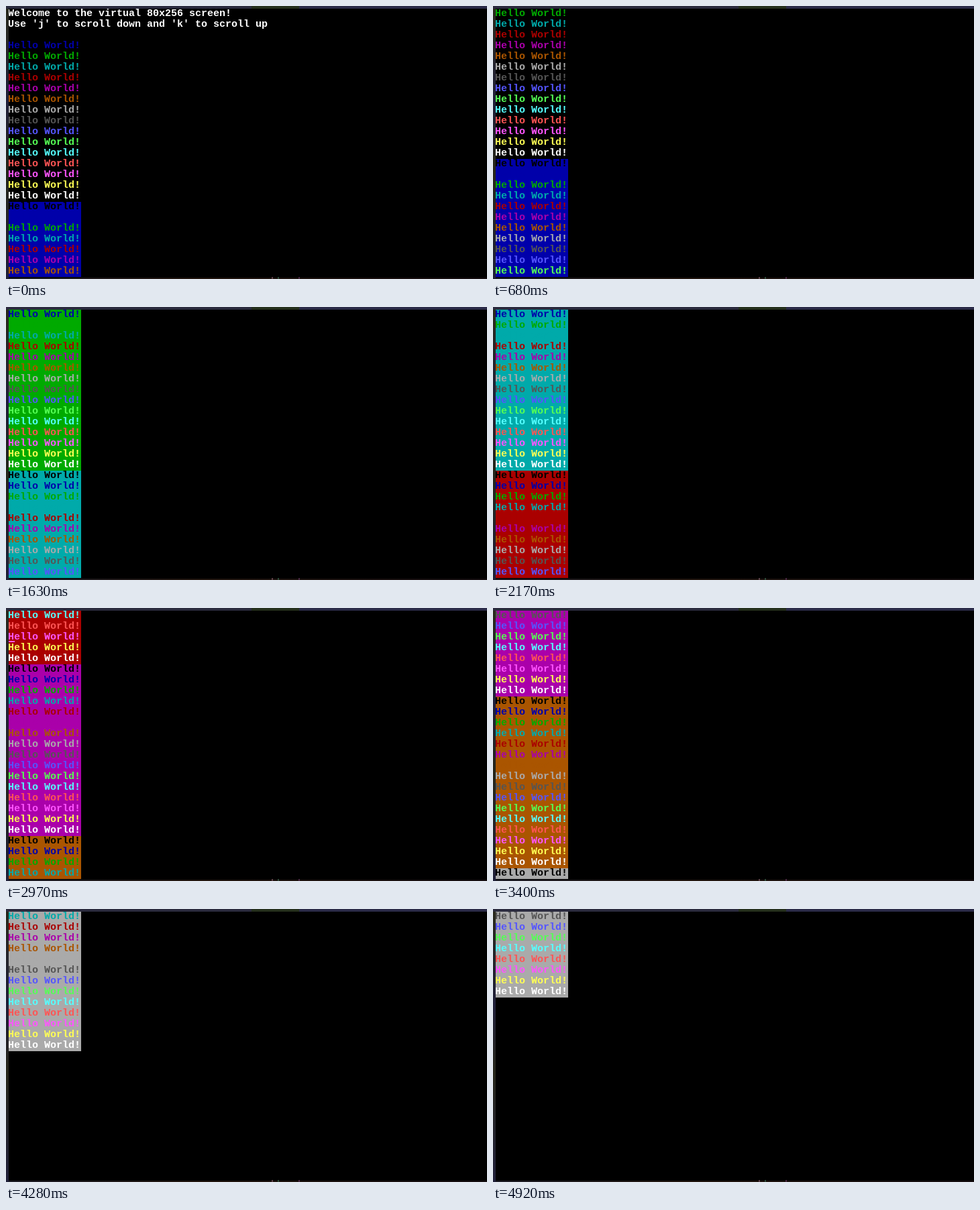
An HTML page that plays this animation: 717 by 407 pixels, repeating every 5.02 s.

```html
<!DOCTYPE html>
<html lang="en">
<head>
<meta charset="utf-8">
<title>Virtual text screen</title>
<style>
  html, body { margin: 0; width: 100%; height: 100%; overflow: hidden; background: #000; }
  #stage {
    position: relative; width: 717px; height: 407px; overflow: hidden;
    background:
      linear-gradient(90deg, #2b2b3e 0 51%, #25301c 51% 61%, #2b2b48 61%) 0 0 / 717px 4px no-repeat,
      linear-gradient(#2a2a1c, #20203a 35%, #26261a 60%, #20203a) 0 0 / 4px 407px no-repeat,
      linear-gradient(90deg, #1c1c26, #21150e 40%, #140d10) 0 405px / 717px 2px no-repeat,
      #000;
  }
  #screen {
    position: absolute; left: 4px; top: 4px; width: 713px; height: 400px;
    overflow: hidden; background: #000;
  }
  #rows { font: bold 15px/16px "Liberation Mono", monospace; color: #fff; }
  #rows div { height: 16px; text-indent: -1px; white-space: pre; }
  #rows .hello { width: 108px; }
  #cursor { position: absolute; left: 0; top: 45px; width: 9px; height: 2px; }
  .speck { position: absolute; top: 404px; width: 2px; height: 3px; }
</style>
</head>
<body>
<div id="stage">
  <div id="screen">
    <div id="rows">
      <div>Welcome to the virtual 80x256 screen!</div>
      <div>Use 'j' to scroll down and 'k' to scroll up</div>
    </div>
    <div id="cursor"></div>
  </div>
  <i class="speck" style="left:396px;background:#5c4048"></i>
  <i class="speck" style="left:405px;background:#2c4a38"></i>
  <i class="speck" style="left:436px;background:#4a2844"></i>
</div>
<script>
const LOOP = 5020, ROW = 16, HEADER = 2, CURSOR_ROW = 2, BLINK = 1600 / 3;

// [time in ms, first visible row]
const scrollKeys = [
  [0, 0], [190, 1], [590, 2], [675, 4], [1625, 35], [2165, 51],
  [2965, 77], [3815, 103], [4420, 122], [LOOP, 122]
];

const rows = document.getElementById('rows');
const cursor = document.getElementById('cursor');

// 16-colour text palette: bits are intensity, red, green, blue
function palette(index) {
  if (index === 6) return 'rgb(170,85,0)';
  const base = index & 8 ? 85 : 0;
  return `rgb(${[4, 2, 1].map(bit => base + (index & bit ? 170 : 0))})`;
}

for (let attr = 0; attr < 128; attr++) {
  const row = document.createElement('div');
  row.className = 'hello';
  row.textContent = 'Hello World!';
  row.style.color = palette(attr & 15);
  row.style.background = palette(attr >> 4);
  rows.append(row);
}

function firstRow(t) {
  const i = scrollKeys.findIndex(key => t < key[0]);
  const [t0, v0] = scrollKeys[i - 1], [t1, v1] = scrollKeys[i];
  return Math.floor(v0 + (v1 - v0) * (t - t0) / (t1 - t0));
}

function draw() {
  const t = performance.now() % LOOP;
  const top = firstRow(t);
  const phase = t % BLINK;
  rows.style.transform = `translateY(${-top * ROW}px)`;
  cursor.style.background = palette((top + CURSOR_ROW - HEADER) & 15);
  cursor.style.visibility = phase > 222 && phase < 489 ? 'visible' : 'hidden';
  requestAnimationFrame(draw);
}
draw();
</script>
</body>
</html>
```
